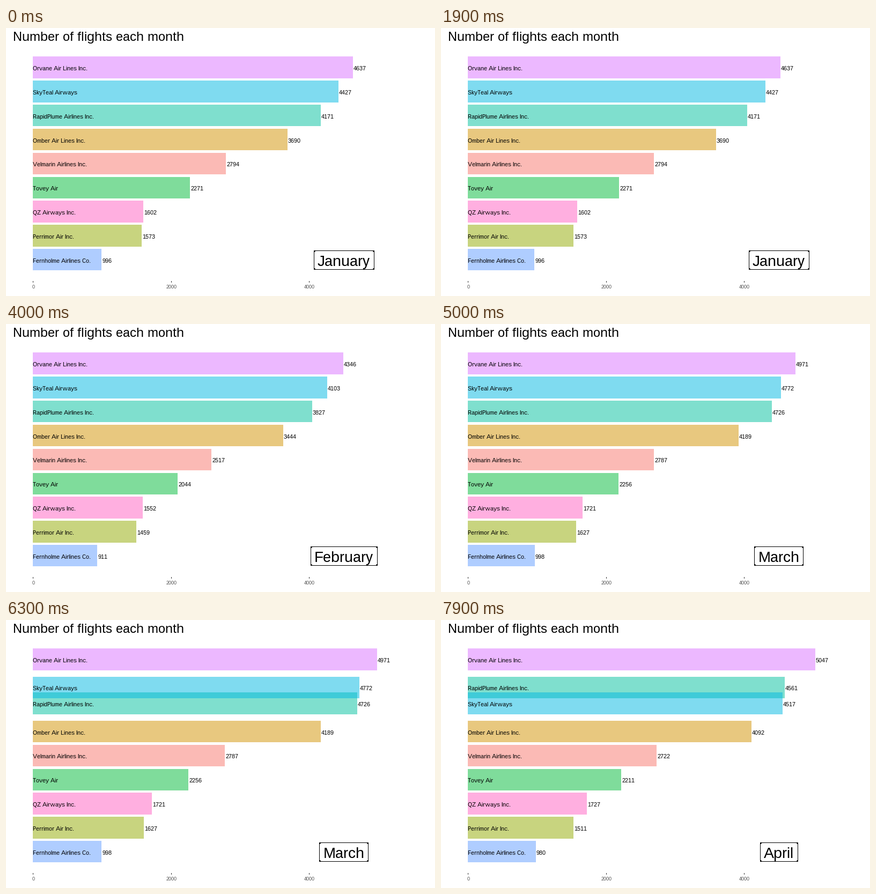
Animation, 800 px wide and 500 px high, one loop 8000 ms. Source, as a matplotlib script:

```python
import numpy as np
import matplotlib.pyplot as plt
from matplotlib.animation import FuncAnimation
from matplotlib.patches import FancyBboxPatch, Rectangle

# full hinting and no kerning give whole-pixel letter spacing
plt.rcParams.update({
    "font.family": "Liberation Sans",
    "text.hinting": "native",
    "text.hinting_factor": 1,
    "text.kerning_factor": 6,
    "toolbar": "None",
})

W, H, DPI = 800, 500, 72
X0, SCALE = 50.2, 0.12875             # zero line and pixels per flight
TOP, STEP, BAR = 73.47, 44.85, 40.4   # first row centre, row pitch, bar height

# name, colour, flights in each month
AIRLINES = [
    ("Orvane Air Lines Inc.", "#DB72FF", (4637, 4346, 4971, 5047)),
    ("RapidPlume Airlines Inc.", "#00C19F", (4171, 3827, 4726, 4561)),
    ("SkyTeal Airways", "#00B9E3", (4427, 4103, 4772, 4517)),
    ("Omber Air Lines Inc.", "#D39200", (3690, 3444, 4189, 4092)),
    ("Velmarin Airlines Inc.", "#F8766D", (2794, 2517, 2787, 2722)),
    ("Tovey Air", "#00BA38", (2271, 2044, 2256, 2211)),
    ("QZ Airways Inc.", "#FF61C3", (1602, 1552, 1721, 1727)),
    ("Perrimor Air Inc.", "#93AA00", (1573, 1459, 1627, 1511)),
    ("Fernholme Airlines Co.", "#619CFF", (996, 911, 998, 980)),
]
MONTHS = [("January", 113), ("February", 125), ("March", 92), ("April", 71)]
KEYS = (10, 34, 59, 83)               # frames at which each month is reached

flights = np.array([a[2] for a in AIRLINES])
ranks = np.argsort(np.argsort(-flights, axis=0), axis=0)

fig = plt.figure(figsize=(W / DPI, H / DPI), dpi=DPI, facecolor="white")
ax = fig.add_axes([0, 0, 1, 1])
ax.set_xlim(0, W)
ax.set_ylim(H, 0)
ax.axis("off")


def label(x, y, text, size, **kw):
    return ax.text(x, y, text, fontsize=size, va="baseline", **kw)


label(13, 24, "Number of flights each month", 24)

for value in (0, 2000, 4000):
    x = round(X0 + value * SCALE)
    ax.add_patch(Rectangle((x, 472), 1, 3, fc="#333333", lw=0))
    label(x + 1, 486, str(value), 9, color="#4D4D4D", ha="center")

bars, names, counts = [], [], []
for name, color, _ in AIRLINES:
    bar = Rectangle((50, 0), 1, BAR, fc=color, alpha=0.5, lw=0, zorder=1)
    bars.append(ax.add_patch(bar))
    names.append(label(50, 0, name, 11, zorder=3))
    counts.append(label(0, 0, "", 11, zorder=3))

box = FancyBboxPatch((0, 415.5), 1, 35, fc="white", ec="black", lw=1,
                     boxstyle="round,pad=0,rounding_size=2",
                     antialiased=False, zorder=4)
ax.add_patch(box)
month_text = label(630, 444, "", 28, ha="center", zorder=5)


def draw(frame):
    pos = np.interp(frame, KEYS, range(len(KEYS)))
    a = min(int(pos), len(KEYS) - 2)
    t = pos - a
    shown = a + (t >= 0.5)

    ends = X0 + SCALE * ((1 - t) * flights[:, a] + t * flights[:, a + 1])
    rows = TOP + STEP * ((1 - t) * ranks[:, a] + t * ranks[:, a + 1])
    for i, (end, y) in enumerate(zip(ends, rows)):
        bars[i].set_y(y - BAR / 2)
        bars[i].set_width(end - 50)
        base = round(y + 5.5)
        names[i].set_y(base)
        counts[i].set_position((round(end) + 1, base))
        counts[i].set_text(str(flights[i, shown]))

    month, width = MONTHS[shown]
    month_text.set_text(month)
    box.set_x(round(630.5 - width / 2) + 0.5)
    box.set_width(width - 1)
    return [*bars, *names, *counts, box, month_text]


anim = FuncAnimation(fig, draw, frames=80, interval=100, repeat=True,
                     repeat_delay=0, blit=False)
plt.show()
```
